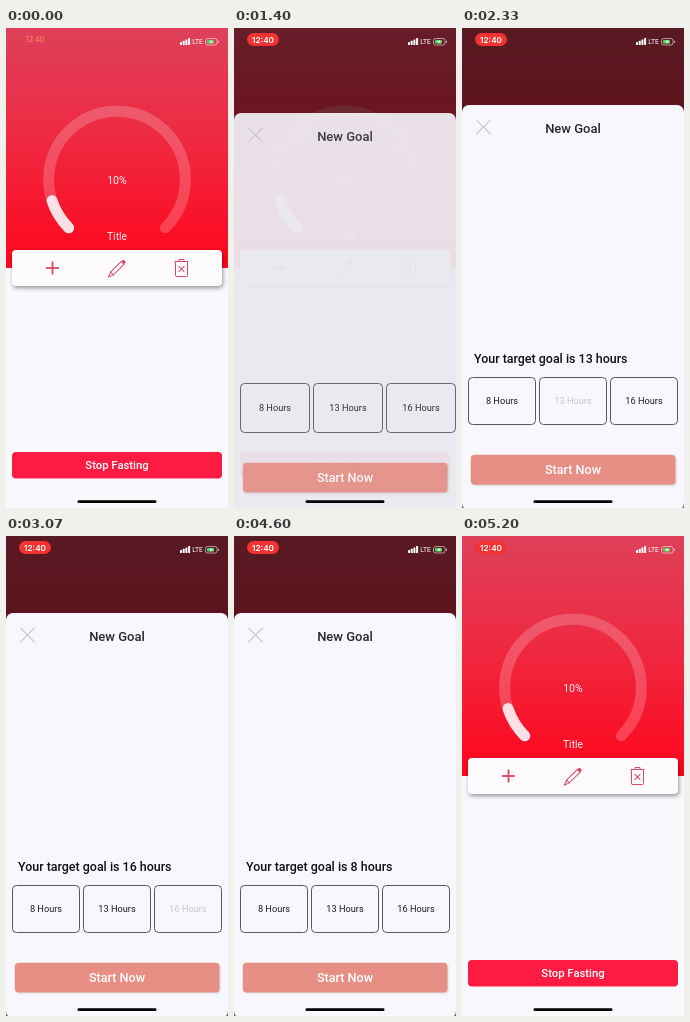
An HTML page with a canvas that plays this animation: 222x480 px, repeating every 5270 ms.

```html
<!DOCTYPE html>
<html lang="en">
<head>
<meta charset="utf-8">
<title>Fasting timer</title>
<style>
html, body { margin: 0; width: 100%; height: 100%; overflow: hidden; background: #f8f8fd; }
canvas { display: block; width: 222px; height: 480px; }
</style>
</head>
<body>
<canvas id="stage"></canvas>
<script>
const W = 222, H = 480, MID = W / 2, LOOP = 5270;
const FONT = 'Roboto, Arial, sans-serif';
const OPEN = 1130, CLOSE = 4600, GONE = 5170, TRAVEL = 474;
const FIRST_TAP = 2100, TAP_GAP = 700, PRESS = 350;
const picks = [13, 16, 13, 8];

const canvas = document.getElementById('stage');
const ctx = canvas.getContext('2d');
const dpr = window.devicePixelRatio || 1;
canvas.width = W * dpr;
canvas.height = H * dpr;

const ramp = (t, a, b) => Math.max(0, Math.min(1, (t - a) / (b - a)));
const mix = (a, b, p) => a + (b - a) * p;

// Damped spring on the way in, a pull back before the way out
function sheetY(t) {
  if (t < CLOSE) {
    const s = (t - OPEN) / 1000;
    return TRAVEL * Math.exp(-8.1 * s) * Math.cos(Math.PI * s / 0.6);
  }
  const p = ramp(t, CLOSE, GONE), back = 0.944;
  return TRAVEL * p * p * ((back + 1) * p - back);
}

const fade = t => ramp(t, OPEN, OPEN + 300) * (1 - ramp(t, CLOSE, GONE) ** 5);

function box(x, y, w, h, r, fill, stroke) {
  ctx.beginPath();
  ctx.roundRect(x, y, w, h, r);
  if (fill) { ctx.fillStyle = fill; ctx.fill(); }
  if (stroke) { ctx.strokeStyle = stroke; ctx.lineWidth = 1; ctx.stroke(); }
}

function raised(strength, blur, paint) {
  ctx.save();
  ctx.shadowColor = `rgba(0,0,0,${strength})`;
  ctx.shadowBlur = blur * dpr;
  ctx.shadowOffsetX = dpr;
  ctx.shadowOffsetY = dpr * blur / 2;
  paint();
  ctx.restore();
}

function label(str, x, y, size, color, weight = 400, align = 'center', font = FONT) {
  ctx.font = `${weight} ${size}px ${font}`;
  ctx.textAlign = align;
  ctx.fillStyle = color;
  ctx.fillText(str, x, y + size * 0.355);
}

function cross(x, y, r, turn, color, width) {
  ctx.save();
  ctx.translate(x, y);
  ctx.rotate(turn);
  ctx.fillStyle = color;
  ctx.fillRect(-r, -width / 2, r * 2, width);
  ctx.fillRect(-width / 2, -r, width, r * 2);
  ctx.restore();
}

function gauge(part, color) {
  const start = Math.PI * 0.75;
  ctx.beginPath();
  ctx.arc(MID, 151.5, 68.3, start, start + Math.PI * 1.5 * part);
  ctx.strokeStyle = color;
  ctx.lineWidth = 11;
  ctx.lineCap = 'round';
  ctx.stroke();
  ctx.lineCap = 'butt';
}

function pencil(x, y, color) {
  ctx.save();
  ctx.translate(x, y);
  ctx.rotate(-Math.PI / 4);
  box(-7, -2, 15, 4, 0, null, color);
  box(8, -2, 3, 4, 1, color);
  ctx.beginPath();
  ctx.moveTo(-7, -2);
  ctx.lineTo(-12, 0);
  ctx.lineTo(-7, 2);
  ctx.stroke();
  ctx.restore();
}

function bin(x, y, color) {
  box(x - 6, y - 6.5, 12, 15, 1, null, color);
  box(x - 2.5, y - 8.5, 5, 2, 0, null, color);
  box(x - 7, y - 7, 14, 1, 0, color);
  cross(x, y + 1, 4, Math.PI / 4, color, 1);
}

function home() {
  ctx.fillStyle = '#f8f8fd';
  ctx.fillRect(0, 0, W, H);
  const sky = ctx.createLinearGradient(0, 0, 0, 240);
  sky.addColorStop(0, '#de4059');
  sky.addColorStop(0.45, '#ee2a42');
  sky.addColorStop(1, '#ff061c');
  ctx.fillStyle = sky;
  ctx.fillRect(0, 0, W, 240);

  gauge(1, 'rgba(255,255,255,0.2)');
  gauge(0.1, '#fce0e5');
  label('10%', MID, 152, 10.6, '#ffeef0');
  label('Title', MID, 208.5, 10.4, '#ffeef0');

  raised(0.4, 4, () => box(6, 222, 210, 36, 4, '#fdfbfd'));
  const red = '#d94a62';
  cross(46.5, 240, 6.5, 0, red, 1.8);
  pencil(111, 240.5, red);
  bin(175.5, 240, red);

  box(6, 424, 210, 26.5, 4, '#ff1b42');
  label('Stop Fasting', MID, 437.3, 11.3, '#fff', 500);
}

function sheet(t) {
  const tap = Math.min(Math.floor((t - FIRST_TAP) / TAP_GAP), picks.length - 1);
  const chosen = picks[tap];
  const pressed = t - FIRST_TAP - tap * TAP_GAP < PRESS;

  box(0, 77, W, 405, 7, '#f8f7fd');
  cross(21.5, 99, 10, Math.PI / 4, '#bcbcc0', 0.9);
  label('New Goal', MID, 100.6, 13, '#29292c', 500);
  if (chosen) {
    label(`Your target goal is ${chosen} hours`, 12, 330.4, 12.45, '#101012', 500, 'left');
  }

  // The row is a little wider until a goal is picked
  const w = chosen ? 68 : 70, h = w - 20.5;
  const y = chosen ? 349 : 347;
  [8, 13, 16].forEach((hours, i) => {
    const x = 6 + i * (w + 3);
    const light = chosen === hours && pressed;
    box(x + 0.5, y + 0.5, w - 1, h - 0.5, 4, null, '#58585c');
    label(`${hours} Hours`, x + w / 2, y + h / 2 + 0.2, 9.2, light ? '#c6c6ca' : '#1c1c1f');
  });

  raised(0.12, 2, () => box(8.8, 426.8, 204.7, 29.8, 4, '#e78f84'));
  label('Start Now', MID, 441.3, 12.6, '#fff', 500);
}

function statusBar(t) {
  const p = ramp(t, 40, 650);
  ctx.globalAlpha = p;
  box(13, 5, 32, 13, 6.5, '#f13433');
  ctx.globalAlpha = 1;
  const tone = `rgb(255,${mix(150, 255, p)},${mix(100, 255, p)})`;
  label('12:40', 29, 11.6, mix(7.2, 8.2, p), tone, p > 0.5 ? 600 : 400, 'center', 'Inter, Arial, sans-serif');

  for (let i = 0; i < 4; i++) {
    const h = 3 + i * 1.3;
    box(174 + i * 2.7, 17 - h, 2, h, 0.5, '#fff');
  }
  label('LTE', 191.5, 13.8, 6.7, '#fff');
  box(199.5, 10.5, 11.5, 6.5, 2, null, 'rgba(255,255,255,0.55)');
  box(201, 12, 7, 3.5, 0.8, '#4cd964');
  box(212, 12.6, 1, 2.4, 0.5, 'rgba(255,255,255,0.6)');
  cross(205.2, 13.8, 1.6, 0.4, '#fff', 0.9);
}

function draw(t) {
  ctx.setTransform(dpr, 0, 0, dpr, 0, 0);
  home();
  const shown = fade(t);
  if (shown > 0) {
    ctx.fillStyle = `rgba(0,0,0,${0.6 * shown})`;
    ctx.fillRect(0, 0, W, H);
    ctx.save();
    ctx.globalAlpha = shown;
    ctx.translate(0, sheetY(t));
    sheet(t);
    ctx.restore();
  }
  statusBar(t);
  box(71.5, 472.3, 79, 2.8, 1.4, '#000');
}

const begin = performance.now();
function tick() {
  draw((performance.now() - begin) % LOOP);
  requestAnimationFrame(tick);
}
tick();
</script>
</body>
</html>
```
